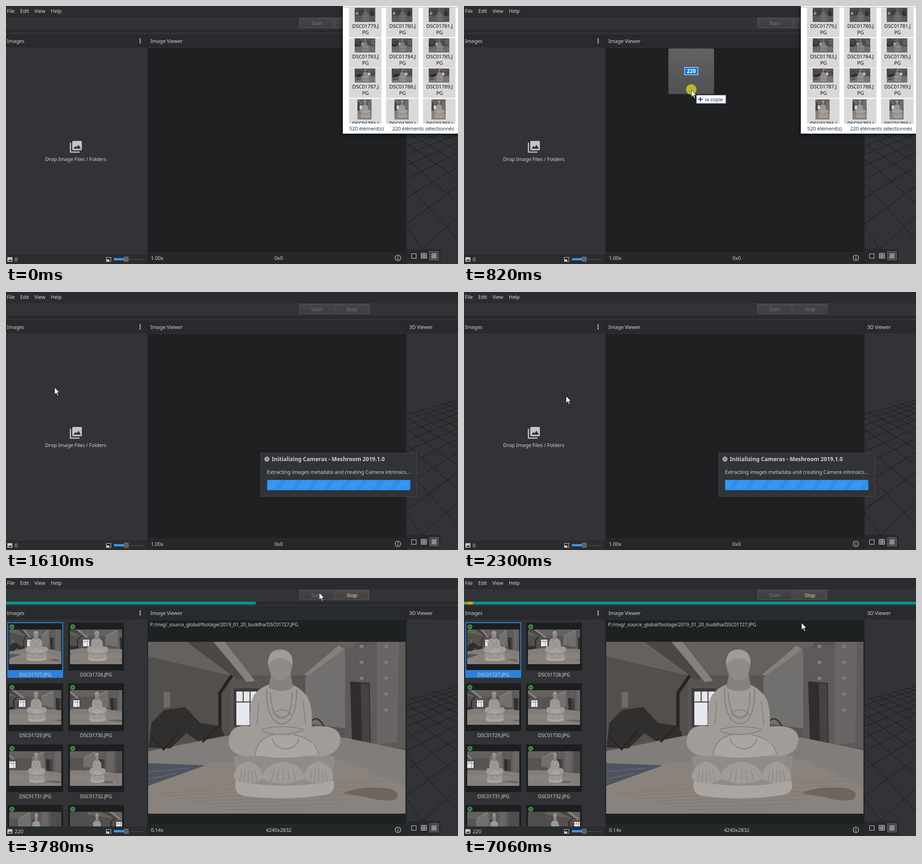
Recreate the animation shown at these times as an HTML page. Size 989x566 px, loop 7.11 s.

```html
<!DOCTYPE html>
<html lang="en">
<head>
<meta charset="utf-8">
<title>Image import</title>
<style>
  html, body { margin: 0; width: 100%; height: 100%; overflow: hidden; background: #303235; }
  svg { display: block; width: 989px; height: 566px; }
  svg svg { width: auto; height: auto; }
  text { font: 11.3px "Noto Sans", "Open Sans", sans-serif; letter-spacing: -.2px; fill: #cfd0d0; white-space: pre; }
  .mid { text-anchor: middle; }
  .bold { font-weight: 700; font-size: 12.1px; letter-spacing: 0; }
  .label { font-size: 10.9px; text-anchor: middle; }
  .path { font-size: 10.65px; }
  #explorer text { fill: #111; }
  #explorer .status { fill: #1e395b; }
  #explorer { filter: drop-shadow(0 2px 5px rgba(0,0,0,.75)); }
  #drag .card { filter: drop-shadow(1px 2px 2px rgba(0,0,0,.35)); }
</style>
</head>
<body>
<svg id="stage" viewBox="0 0 989 566"></svg>
<script>
const LOOP = 7110;
const stage = document.getElementById('stage');
const clamp = (v, a = 0, b = 1) => Math.min(b, Math.max(a, v));
const range = n => [...Array(n).keys()];

const rect = (x, y, w, h, fill, extra = '') =>
  `<rect x="${x}" y="${y}" width="${w}" height="${h}" fill="${fill}" ${extra}/>`;
const box = (x, y, w, h, fill, stroke) => rect(x + .5, y + .5, w - 1, h - 1, fill, `stroke="${stroke}"`);
const poly = (points, fill) => `<polygon points="${points}" fill="${fill}"/>`;
const oval = (x, y, rx, ry, fill) => `<ellipse cx="${x}" cy="${y}" rx="${rx}" ry="${ry}" fill="${fill}"/>`;
const line = (d, stroke, width = 1) => `<path d="${d}" fill="none" stroke="${stroke}" stroke-width="${width}"/>`;
const shape = (d, fill) => `<path d="${d}" fill="${fill}"/>`;
const text = (x, y, s, cls = '', extra = '') => `<text x="${x}" y="${y}" class="${cls}" ${extra}>${s}</text>`;
const group = (id, content, extra = '') => `<g id="${id}" ${extra}>${content}</g>`;
const shading = (id, top, bottom) =>
  `<linearGradient id="${id}" x2="0" y2="1"><stop stop-color="${top}"/><stop offset="1" stop-color="${bottom}"/></linearGradient>`;

function aperture(x, y, r, color) {
  const blades = range(6).map(i => {
    const a = i * Math.PI / 3;
    const at = (q, k) => `${x + k * r * Math.cos(q)} ${y + k * r * Math.sin(q)}`;
    return `M${at(a, 1)}L${at(a + 1.25, .4)}`;
  }).join('');
  return `<circle cx="${x}" cy="${y}" r="${r}" fill="none" stroke="${color}" stroke-width="1.6"/>` + line(blades, color, 1.2);
}

function room() {
  return rect(311, 140, 563, 377, '#575453') +
    poly('311,140 770,140 706,214 490,214 311,172', '#65615f') +
    poly('311,172 490,214 490,345 311,372', '#524f4d') +
    poly('395,140 452,140 524,222 505,222', '#4a4745') +
    poly('455,140 478,140 545,226 526,228', '#85807c') +
    poly('728,148 740,156 664,215 652,212', '#85807c') +
    poly('655,218 742,155 742,330 655,318', '#72706f') +
    poly('742,152 874,140 874,375 742,360', '#5d5a59') +
    poly('812,140 860,140 856,360 812,366', '#686564') +
    range(8).map(i => oval(i < 3 ? 778 : 832, 150 + i % 5 * 35, 5, 4, '#7c7977')).join('') +
    poly('753,227 796,230 798,369 757,362', '#302d2d') +
    poly('776,231 794,232 796,364 779,360', '#454241') +
    rect(345, 250, 14, 34, '#6e6a68') +
    rect(498, 242, 54, 84, '#3d3a39') + rect(504, 249, 44, 74, '#e6e7ef') +
    line('M504 272H548M519 249V272M534 249V323', '#55524f', 2.5) +
    line('M494 214L468 252V332', '#252323', 7) +
    poly('311,380 490,345 740,350 874,378 874,517 311,517', '#817d7b') +
    shape('M312 372L318 318L345 290L392 283L425 318L470 325L478 346L420 358L395 340L360 374Z', '#312e2e') +
    line('M320 350L345 376L380 335M430 360L470 320', '#292626', 4) +
    line('M665 350V318Q680 296 696 326', '#353231', 3) +
    poly('311,452 450,404 740,398 874,458 874,517 311,517', '#8a827c') +
    range(7).map(i => line(`M${330 + i * 25} ${472 + i * 6}L${840 - i * 20} ${445 + i * 10}`, '#7f7872', 1.2)).join('') +
    poly('311,406 436,411 311,456', '#4d545f') + line('M311 425L400 417M311 442L372 428', '#5f6671', 2) +
    shape('M738 472Q775 455 835 461Q870 470 850 487Q815 490 790 481Z', '#6c6560');
}

function statue() {
  const stone = '#a19c97', shade = '#86817d', pale = '#aba6a1';
  return shape('M498 392Q608 372 720 392L714 436Q726 474 690 476Q608 488 522 478Q494 470 506 440Z', '#918c87') +
    shape('M503 444Q608 468 716 444Q724 470 698 476Q608 490 520 478Q496 472 503 444Z', pale) +
    [[530, 32], [607, 46], [684, 32]].map(([x, r]) =>
      shape(`M${x - r} 440Q${x - r} 412 ${x} 402Q${x + r} 412 ${x + r} 440Q${x} 462 ${x - r} 440Z`, stone) +
      range(5).map(i => line(`M${x + (i - 2) * r * .3} 448L${x + (i - 2) * r * .22} 420`, shade, 1.2)).join('')).join('') +
    shape('M580 232Q558 238 543 256Q532 274 534 325Q487 318 487 362Q492 394 545 391H680Q728 392 732 355Q732 320 669 326Q672 272 654 254Q642 240 622 232Z', stone) +
    shape('M580 210H623L628 240Q602 256 574 240Z', shade) +
    shape('M574 190Q572 158 600 157Q628 158 626 190Q624 224 601 225Q578 224 574 190Z', '#908b86') +
    shape('M573 192Q572 157 600 157Q629 157 627 192Q618 175 600 176Q583 175 573 192Z', stone) +
    line('M570 242Q570 318 604 320Q636 316 636 244M578 250Q582 308 604 308Q626 306 626 250', shade, 2.5) +
    line('M560 332Q605 320 652 332M585 298Q604 280 624 298Q604 310 585 298M553 272L549 322M650 270L656 322', shade, 2) +
    shape('M545 388Q545 350 590 345H628Q684 352 684 385Q610 402 545 388Z', pale) +
    line('M582 352Q590 374 612 375Q636 373 641 352M560 336Q604 352 650 334M545 390Q548 352 585 344M684 388Q680 354 630 344', shade, 2);
}

// A photo in a frame; turn < 1 narrows the figure, the room is placed by its window.
function photo(x, y, w, h, turn = 1, windowX = 526, zoom = 1) {
  return `<svg x="${x}" y="${y}" width="${w}" height="${h}" viewBox="311 140 563 377" preserveAspectRatio="xMidYMid slice" style="width:${w}px;height:${h}px">` +
    rect(-400, 140, 2000, 377, '#504d4c') + rect(-400, 380, 2000, 137, '#837d79') +
    `<use href="#room" transform="translate(${windowX - 526 * zoom} 0) scale(${zoom} 1)"/>` +
    `<use href="#statue" transform="translate(${608 * (1 - turn)} 0) scale(${turn} 1)"/></svg>`;
}

function thumbs() {
  const windows = [526, 486, 450, 380, 345, 250, 200, 845];
  return range(8).map(i => {
    const x = 3 + i % 2 * 133, y = 97 + Math.round((i >> 1) * 133.4);
    const frame = i === 0
      ? rect(x, y, 122, 122, '#2a82da') + rect(x + 2, y + 2, 118, 103, '#1c1e20')
      : rect(x, y + 1, 122, 105, '#1c1e20');
    return frame + photo(x + 4, y + 16, 114, 76, 1 - .06 * Math.min(i, 6), windows[i], i ? 1.6 : 1) +
      aperture(x + 10, y + 10, 4.5, '#4caf50') +
      text(x + 61, y + 118.5, `DSC0${1727 + i}.JPG`, 'label');
  }).join('');
}

function explorer() {
  const cells = range(12).map(i => {
    const col = i % 3, row = i / 3 | 0, x = 750 + col * 81, y = 3 + Math.round(row * 66.6);
    const name = 1779 + row * 4 + col, hover = i === 6 ? 'id="hover"' : '';
    return rect(x + .5, y + .5, 71, 65, '#d9d9d9', hover) +
      (row < 3 ? photo(x + 13, y + 1, 45, 31, .85, 380 + 160 * row, 1.6) + rect(x + 13, y + 1, 45, 31, '#222', `opacity="${[.4, .22, .12][row]}"`)
               : photo(x + 19, y + 2, 31, 44, .8, 526, 1)) +
      text(x + 36.5, y + (row < 3 ? 45 : 59), `DSC0${name}.J`, 'mid') + text(x + 36.5, y + 59, row < 3 ? 'PG' : '', 'mid');
  }).join('');
  return rect(737, 0, 260, 280, '#fff') + rect(737, 2, 260, 1, '#aaa') +
    `<g clip-path="url(#listClip)">${cells}</g>` +
    text(751, 273, '520 élément(s)', 'status') + text(845, 273, '220 éléments sélectionnés', 'status');
}

// Perspective floor: each family of lines runs to its own vanishing point on the horizon.
function floorGrid() {
  const horizon = 140, depth = 500;
  const fan = (x, first, step, n) => range(n).map(i =>
    `M${x} ${horizon}L${x + (first + step * i) * depth} ${horizon + depth}`).join('');
  return `<g clip-path="url(#floorClip)">${line(fan(1339, -3.61, .28, 12) + fan(650, .41, .25, 14), '#1d1e20', 1.1)}</g>`;
}

const button = (id, x, label) => group(id,
  box(x, 26, 76, 22, 'url(#dull)', '#57595c') + text(x + 38, 41.5, label, 'mid'));

const imageIcon = (x, y) => rect(x, y, 11, 10, '#c4c6c7', 'rx="1"') + poly(`${x + 1.5},${y + 8.5} ${x + 4},${y + 5} ${x + 5.5},${y + 6.5} ${x + 7.5},${y + 4} ${x + 9.8},${y + 8.5}`, '#292b2d');

const emptyHint = line('M141 300V320.500H161', '#c3c4c5', 2.6) + rect(145, 296, 21, 20.5, '#c3c4c5', 'rx="2"') +
  poly('147.500,313 152,307 154.500,310 158.500,304.500 164,313', '#303235') + text(152.5, 340, 'Drop Image Files / Folders', 'mid');

const frame =
  rect(0, 0, 989, 566, '#313336') + rect(0, 0, 989, 23, '#2a2c2f') + rect(0, 23, 989, 1, '#26282a') +
  rect(0, 52, 989, 6, '#27292b') + rect(0, 62, 989, 29, '#282a2d') +
  [['File', 2], ['Edit', 31], ['View', 62], ['Help', 98]].map(([s, x]) => text(x, 15, s)).join('') +
  button('start', 642, 'Start') + button('stop', 719, 'Stop') +
  text(2, 81, 'Images') + text(316, 81, 'Image Viewer') + text(882, 81, '3D Viewer') +
  [72.5, 76.5, 80.5].map(y => oval(293.5, y, 1.4, 1.4, '#dcdcdc')).join('') +
  floorGrid() + rect(309, 62, 2, 504, '#222426') + rect(874, 62, 3, 504, '#242628') +
  rect(311, 92, 563, 448, '#1f2022');

const footer =
  rect(0, 545, 309, 21, '#2a2c2e') + imageIcon(3, 551) + text(19, 560, '0', '', 'id="count"') +
  box(219, 551, 11, 10, 'none', '#c4c6c7') + rect(220, 556, 6, 4, '#c4c6c7') +
  rect(268, 555.5, 34, 1.5, '#46484b') + rect(236, 553, 23, 5, '#3498f0') + box(258, 550, 10, 11, '#5d5f62', '#77797c') +
  rect(311, 540, 563, 26, '#252729') + text(317, 557, '1.00x', '', 'id="zoom"') + text(596.5, 557, '0x0', 'mid', 'id="size"') +
  '<circle cx="857.500" cy="552.500" r="6" fill="none" stroke="#cfd0d0" stroke-width="1.2"/>' + line('M857.500 549V550.500M857.500 551.800V556', '#cfd0d0', 1.4) +
  rect(877, 533, 74, 30, '#27292b', 'rx="2"') + box(887, 543, 11, 11, 'none', '#d5d5d5') +
  line('M908.500 542.500H920V553.500H908.500ZM908.500 546.500H920M908.500 550H920M912.500 542.500V553.500M916 542.500V553.500', '#d0d0d0', 1.2) +
  box(926, 538, 21, 20, '#45474a', '#65676a') +
  line('M931 546L934.500 542.500M931 550.500L939 542.500M931 554L942 543M935 554L942 547M939 554L942 551', '#d5d5d5', 1.3);

const dialog = box(557, 353, 342, 96, '#313337', '#45474b') + aperture(571, 366.5, 4.5, '#cfd0d0') +
  text(581.5, 370.5, 'Initializing Cameras - Meshroom 2019.1.0', 'bold') +
  text(571, 398.5, 'Extracting images metadata and creating Camera intrinsics...', '', 'style="font-size:11.4px"') +
  rect(571.5, 412.5, 313, 22, '#3497f6', 'stroke="#2a75bd"') + rect(572, 413, 312, 21, 'url(#stripes)');

const dragCard = rect(-50, -91, 100, 100, 'url(#glass)', 'class="card" rx="2"') +
  box(-15, -50, 30, 17, '#0a78d7', '#fff') + text(0, -37, '220', 'mid bold', 'style="fill:#fff;font-size:11.5px"') +
  box(11, 11, 65, 19, '#fff', '#8f8f8f') + line('M15 20.500H25M20 15.500V25.500', '#17309c', 2) +
  text(30, 25, 'la copie', '', 'style="fill:#17309c"');

stage.innerHTML = `<defs>
  <g id="room">${room()}</g><g id="statue">${statue()}</g>
  <clipPath id="listClip">${rect(737, 3, 252, 255, '#000')}</clipPath>
  <clipPath id="thumbClip">${rect(0, 92, 309, 453, '#000')}</clipPath>
  <clipPath id="floorClip">${poly('877,267 989,236 989,566 877,566', '#000')}</clipPath>
  <pattern id="stripes" width="36" height="22" patternUnits="userSpaceOnUse">
    ${poly('0,22 16,0 28,0 12,22', '#2f8ee8')}</pattern>
  ${shading('dull', '#434548', '#3b3d40')}${shading('ready', '#505255', '#434548')}${shading('warm', '#4d4a48', '#444140')}
  <linearGradient id="glass" x2="0" y2="1"><stop stop-color="#fff" stop-opacity=".31"/><stop offset="1" stop-color="#fff" stop-opacity=".23"/></linearGradient>
</defs>` + frame +
  group('empty', emptyHint) +
  group('loaded', `<g clip-path="url(#thumbClip)">${thumbs()}</g>` + rect(311, 92, 563, 448, '#1d2122') +
    text(315, 106, 'P:/mvg/_source_global/footage/2019_01_20_buddha/DSC01727.JPG', 'path') + photo(311, 140, 563, 377)) +
  footer +
  group('drop', rect(0, 92, 308.5, 452, '#2a72b8') + text(152.5, 322.5, 'Add Images', 'mid bold')) +
  rect(0, 52, 0, 6, '#00968a', 'id="bar"') + rect(8, 52, 11, 6, '#ff9800', 'id="second"') + rect(0, 52, 8, 6, '#ff9800', 'id="first"') +
  group('explorer', explorer()) + group('dialog', dialog) +
  group('pointer', group('drag', dragCard) + `<circle id="glow" cy="-1" r="11.500" fill="#dcdc20" opacity=".72"/>` +
    '<path d="M.3 .3V15.800L4 12.300L6.600 18.500L9 17.500L6.500 11.500H11.300Z" fill="#fff" stroke="#111" stroke-width=".9"/>');

const el = {};
stage.querySelectorAll('[id]').forEach(e => el[e.id] = e);
const show = (id, on) => el[id].style.display = on ? '' : 'none';
const attr = (id, name, value) => el[id].setAttribute(name, value);

// time, x, y of the pointer
const route = [
  [70, 877, 340], [300, 818, 262], [520, 780, 165], [680, 775, 155], [710, 768, 158], [770, 648, 172],
  [820, 500, 184], [920, 230, 202], [1020, 83, 207], [1510, 83, 207], [1850, 160, 214], [2220, 223, 228],
  [2660, 223, 228], [2900, 480, 130], [3080, 700, 42], [3170, 686, 33], [3350, 685, 32], [4200, 685, 32],
  [4860, 684, 31], [5400, 684, 31], [5550, 681, 35], [5800, 682, 48], [6090, 684, 76], [6140, 686, 80],
  [6400, 706, 101], [6780, 724, 86], [6990, 724, 86], [7060, 738, 98]
];

function pointerAt(t) {
  const i = route.findIndex(p => p[0] > t);
  if (i < 0) return route.at(-1).slice(1);
  if (i === 0) return route[0].slice(1);
  const [a, b] = [route[i - 1], route[i]];
  const k = (t - a[0]) / (b[0] - a[0]);
  return [a[1] + (b[1] - a[1]) * k, a[2] + (b[2] - a[2]) * k];
}

function paintButton(id, enabled, fill) {
  const [face, label] = el[id].children;
  face.setAttribute('fill', `url(#${enabled ? fill : 'dull'})`);
  label.style.fill = enabled ? '#dcdcdc' : '#77797c';
}

function draw(t) {
  const loaded = t >= 2350, running = t >= 3350;
  const [x, y] = pointerAt(t);
  show('pointer', t >= 70);
  attr('pointer', 'transform', `translate(${x} ${y})`);
  show('drag', t >= 700 && t < 1330);
  show('glow', t >= 600 && t < 1330 || running && t < 3450);

  const hovered = t >= 480 && t < 770;
  attr('hover', 'fill', hovered ? '#cce8ff' : '#d9d9d9');
  attr('hover', 'stroke', hovered ? '#99d1ff' : 'none');
  show('explorer', t < 1510);
  show('drop', t >= 900 && t < 1510);
  attr('drop', 'opacity', clamp((t - 900) / 110) * .97);

  show('dialog', t >= 1560 && t < 2350);
  attr('stripes', 'patternTransform', `translate(${(t - 2300) * .04} 413)`);
  show('empty', !loaded);
  show('loaded', loaded);
  el.count.textContent = loaded ? '220' : '0';
  el.zoom.textContent = loaded ? '0.14x' : '1.00x';
  el.size.textContent = loaded ? '4240x2832' : '0x0';

  paintButton('start', loaded && !running, 'ready');
  paintButton('stop', running, 'warm');
  attr('bar', 'width', clamp((t - 3418) * 1.505, 0, 989));
  show('first', t >= 4660);
  attr('first', 'fill', t < 5170 ? '#ff9800' : '#4caf50');
  show('second', t >= 5400);
}

const begin = performance.now();
function tick() {
  draw((performance.now() - begin) % LOOP);
  requestAnimationFrame(tick);
}
tick();
</script>
</body>
</html>
```
